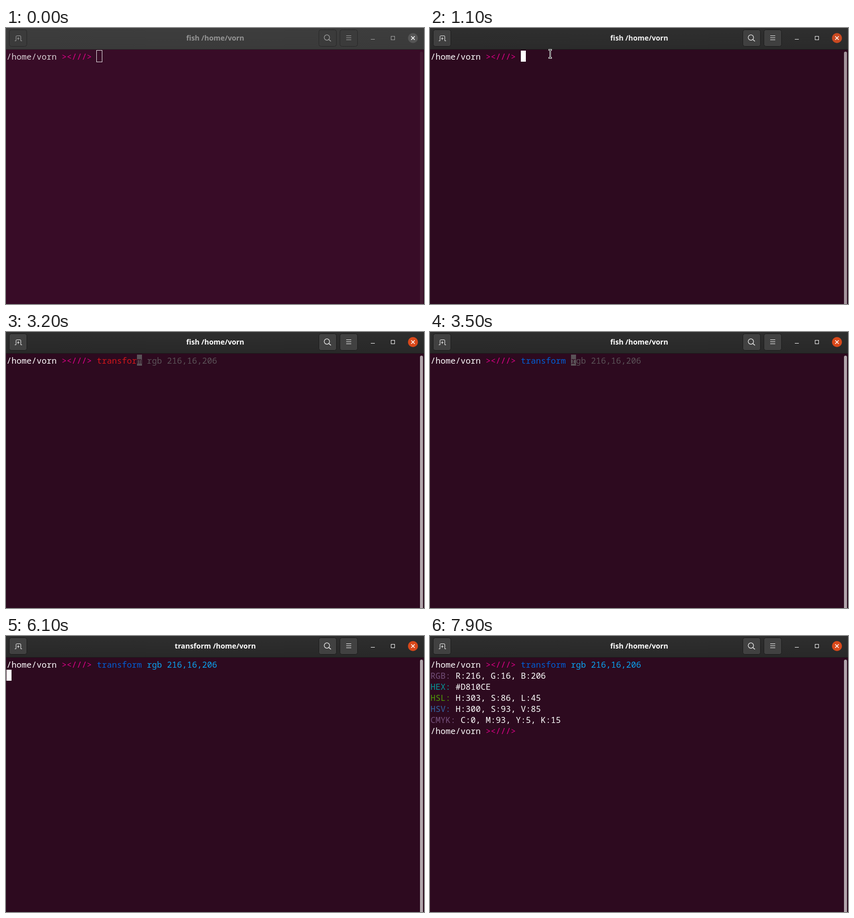
An HTML page for the animation above (8000 ms loop, 833 by 549 pixels).

```html
<!DOCTYPE html>
<html lang="en">
<head>
<meta charset="utf-8">
<title>Terminal</title>
<style>
  html, body { margin: 0; width: 100%; height: 100%; overflow: hidden; background: #2d0a1f; }
  svg { display: block; width: 833px; height: 549px; }
  text { white-space: pre; }
  .mono { font: 16.667px "Noto Sans Mono", monospace; }
  .title { font: bold 14.3px "Noto Sans", sans-serif; text-anchor: middle; }
</style>
</head>
<body>
<svg id="stage" viewBox="0 0 833 549">
  <defs>
    <linearGradient id="barOn" x2="0" y2="1"><stop stop-color="#2e2e2e"/><stop offset="1" stop-color="#282828"/></linearGradient>
    <linearGradient id="barOff" x2="0" y2="1"><stop stop-color="#3d3d3d"/><stop offset="1" stop-color="#3a3a3a"/></linearGradient>
  </defs>
  <rect id="back" width="833" height="549"/>
  <g id="off"></g>
  <g id="on"></g>
  <rect id="block" width="10" height="22"/>
  <rect id="hollow" x="180.5" y="44.5" width="11" height="23" fill="none" stroke="#e4e0e2"/>
  <g id="lines" class="mono"></g>
  <path id="arrow" d="M0 0V15L3.5 11.8 6 17.3 8.6 16.1 6.2 10.8H11Z" fill="#111" stroke="#fff"/>
  <g id="beam" fill="none">
    <path d="M-3.5-8H3.5M0-8V8M-3.5 8H3.5" stroke="#fff" stroke-width="3"/>
    <path d="M-3-8H3M0-8V8M-3 8H3" stroke="#111" stroke-width="1.2"/>
  </g>
</svg>
<script>
const LOOP = 8000, USER = "vorn", HOME = "/home/" + USER;
const COMMAND = "transform rgb 216,16,206", WORD = 9;
const BG = "#2d0a1f", WHITE = "#ffffff", PINK = "#df0088", RED = "#d4161b",
      BLUE = "#005fd7", CYAN = "#0aa2f0", GREY = "#5a5257";

const OUTPUT = [
  ["RGB:", "#75507b", " R:216, G:16, B:206"],
  ["HEX:", "#06989a", " #D810CE"],
  ["HSL:", "#4e9a06", " H:303, S:86, L:45"],
  ["HSV:", "#3465a4", " H:300, S:93, V:85"],
  ["CMYK:", "#75507b", " C:0, M:93, Y:5, K:15"]
];

// [time, value] tables; a value holds until the next entry
const TYPED = [[0, 0], [2200, 1], [2500, 3], [2800, 5], [3000, 7], [3200, 8], [3300, 9], [3500, 10], [4500, 24]];
const CURSOR = [[0, 0], [1100, 1], [1700, 0], [2200, 1], [4100, 0], [4500, 1], [5100, 0], [5800, 1], [6700, 0], [7300, 1], [7900, 0]];
const FOCUS = [[0, 0], [1100, .88], [1200, .96], [1300, 1]];
const POINTER = [[0, null], [500, [320, 1]], [600, [280, 14]], [700, [240, 34]], [800, [239.5, 51.5]], [2200, null]];

const at = (table, t) => table.findLast(([time]) => time <= t)[1];
const $ = id => document.getElementById(id);
const show = (el, visible) => el.setAttribute("display", visible ? "inline" : "none");

function chrome(p) {
  const button = x => `<rect x="${x}" y="3.5" width="35" height="33" rx="4" fill="${p.button}" stroke="${p.edge}"/>`;
  return `<rect width="833" height="43" fill="${p.bar}"/>
    <rect y="42" width="833" height="1" fill="${p.edge}"/>
    ${[6.5, 623.5, 665.5].map(button).join("")}
    <g fill="none" stroke="${p.icon}">
      <path d="M17.5 25.5H20V17Q20 15.5 21.5 15.5H28Q29.5 15.5 29.5 17V25.5H32M24.5 18.5V23.5M22 21H27"/>
      <circle cx="639.5" cy="19" r="5.3" stroke-width="1.2"/>
      <path d="M643.5 23L647.5 26.5" stroke-width="1.5"/>
      <path d="M678 15.5H688M678 19.5H688M678 23.5H688M727 22.5H735"/>
      <rect x="767.5" y="16.5" width="7" height="7"/>
    </g>
    <circle cx="811" cy="20" r="10" fill="${p.close}"/>
    <path d="M807.5 16.5L814.5 23.5M814.5 16.5L807.5 23.5" stroke="${p.cross}" stroke-width="1.5"/>
    <text class="title" x="417" y="25" fill="${p.title}"></text>
    <rect x="825" y="47" width="6" height="510" rx="3" fill="${p.thumb}"/>
    <rect x="832" y="43" width="1" height="506" fill="${p.side}"/>`;
}

$("off").innerHTML = chrome({ bar: "url(#barOff)", button: "#3b3b3b", edge: "#282828", icon: "#a2a2a2",
  close: "#555555", cross: "#ffffff", title: "#949494", thumb: "#431b33", side: "#2a0a1d" });
$("on").innerHTML = chrome({ bar: "url(#barOn)", button: "#414141", edge: "#1b1b1b", icon: "#f2f2f2",
  close: "#d9481a", cross: "#ffffff", title: "#ffffff", thumb: "#b1a6ac", side: "#220818" });

const escape = s => s.replace(/&/g, "&amp;").replace(/</g, "&lt;").replace(/>/g, "&gt;");
const span = (s, fill) => s && `<tspan fill="${fill}">${escape(s)}</tspan>`;
const line = (row, body) => `<text x="1" y="${63 + row * 22}">${body}</text>`;
const prompt = fill => span(HOME + " ", fill) + span("><///> ", PINK);

function commandSpans(typed, blue, cursorOn) {
  if (!typed) return "";
  const rest = COMMAND.slice(typed);
  return span(COMMAND.slice(0, Math.min(typed, WORD)), blue ? BLUE : RED)
    + span(COMMAND.slice(WORD, Math.max(typed, WORD)), CYAN)
    + span(rest.slice(0, 1), cursorOn ? BG : GREY)
    + span(rest.slice(1), GREY);
}

let lastLines = "";
function render(t) {
  const focus = at(FOCUS, t), typed = at(TYPED, t), cursorOn = at(CURSOR, t), pointer = at(POINTER, t);
  const running = t >= 6100 && t < 6500, done = t >= 6500;
  const ink = focus ? WHITE : "#d8d2d5";

  $("back").setAttribute("fill", focus ? BG : "#380c27");
  $("on").setAttribute("opacity", focus);
  $("off").setAttribute("opacity", focus === 1 ? 0 : 1);
  const title = (running ? "transform " : "fish ") + HOME;
  document.querySelectorAll(".title").forEach(el => el.textContent = title);

  let html = line(0, prompt(ink) + commandSpans(typed, t >= 3400, cursorOn));
  if (done) {
    html += OUTPUT.map(([label, color, text], i) => line(i + 1, span(label, color) + span(text, WHITE))).join("");
    html += line(6, prompt(WHITE));
  }
  if (html !== lastLines) $("lines").innerHTML = lastLines = html;

  const [col, row] = done ? [18, 6] : running ? [0, 1] : [18 + typed, 0];
  const block = $("block");
  block.setAttribute("x", 1 + col * 10);
  block.setAttribute("y", 45 + row * 22);
  block.setAttribute("fill", typed && typed < COMMAND.length ? GREY : WHITE);
  show(block, cursorOn);
  show($("hollow"), !focus);

  const overText = pointer && pointer[1] > 43;
  show($("arrow"), pointer && !overText);
  show($("beam"), overText);
  if (pointer) $(overText ? "beam" : "arrow").setAttribute("transform", `translate(${pointer})`);
}

const start = performance.now();
function tick() {
  render((performance.now() - start) % LOOP);
  requestAnimationFrame(tick);
}
tick();
</script>
</body>
</html>
```
